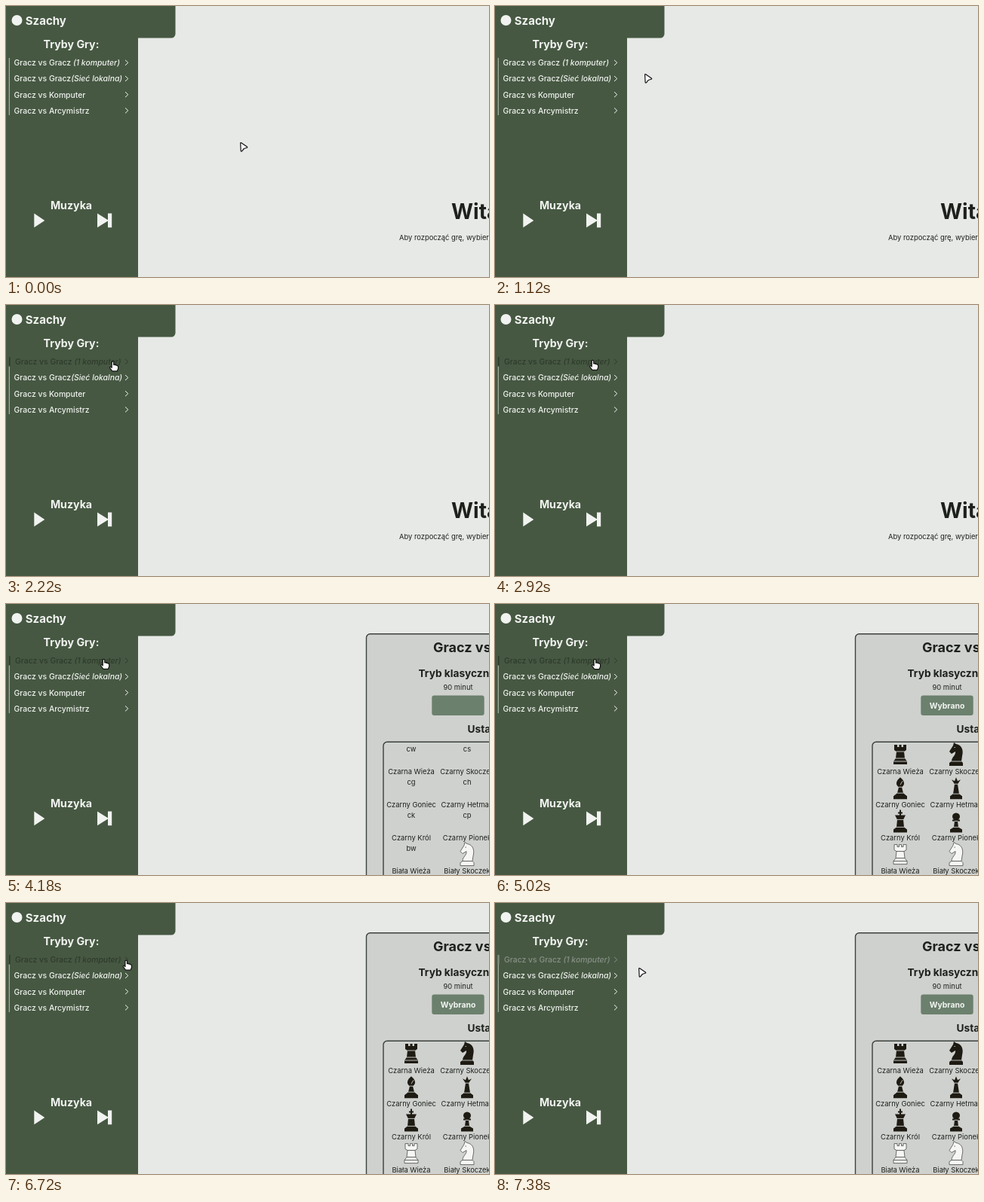
Recreate the animation shown at these times as an HTML page. Size 640 by 360 pixels, loop 7.48 s.

```html
<!DOCTYPE html>
<html lang="pl">
<head>
<meta charset="utf-8">
<style>
  html, body { margin: 0; width: 100%; height: 100%; overflow: hidden; background: #e7e9e6; }
  svg { display: block; width: 640px; height: 360px; font-family: Inter, sans-serif; }
  .bold { font-weight: 700; }
  .mid { text-anchor: middle; }
  .item { font-size: 10.4px; font-weight: 500; }
  .chevron { fill: none; stroke: currentColor; stroke-width: 1; }
  .small { font-size: 9.4px; }
  .black { fill: #1e1b13; stroke: none; }
  .white { fill: #f6f7f5; stroke: #4b4d49; stroke-width: .8; }
  .lines { fill: none; stroke: #cfd1ce; stroke-width: .9; }
  .white + .lines { stroke: #4b4d49; }
  .frame { stroke: #3b413d; stroke-width: 1.4; }
  .cursor { fill: #fff; stroke: #111; stroke-width: 1.2; stroke-linejoin: round; }
</style>
</head>
<body>
<svg viewBox="0 0 640 360">
  <rect width="640" height="360" fill="#e7e9e6"/>

  <g id="welcome" fill="#1d211c">
    <text class="bold" x="590" y="282.5" font-size="28">Witaj</text>
    <text class="small" x="521" y="311">Aby rozpocząć grę, wybierz</text>
  </g>

  <g id="panel" fill="#1d211c">
    <rect class="frame" x="477.5" y="39.7" width="260" height="400" rx="5" fill="#cfd1ce"/>
    <text class="bold" x="566" y="64.3" font-size="18">Gracz vs Gracz</text>
    <text class="bold" x="546.5" y="97.3" font-size="13.7">Tryb klasyczny</text>
    <text class="small mid" x="599" y="113.5">90 minut</text>
    <rect x="564.3" y="121.5" width="69.4" height="26.5" rx="3" fill="#6b806d"/>
    <text id="chosen" class="bold mid" x="599" y="138.5" font-size="10.4" fill="#f3f5f2">Wybrano</text>
    <text class="bold" x="611.5" y="170.5" font-size="13.7">Ustawienie</text>
    <rect class="frame" x="500" y="183.3" width="240" height="300" rx="5" fill="#cfd1ce"/>
    <g id="pieces"></g>
  </g>

  <path d="M0 0H224.5V37a5.5 5.5 0 0 1-5.5 5.5H175V360H0Z" fill="#465842"/>
  <g fill="#f1f3f0">
    <circle cx="14.5" cy="19" r="7"/>
    <text class="bold" x="25.8" y="24.6" font-size="15">Szachy</text>
    <text class="bold mid" x="86.5" y="56.3" font-size="14.2">Tryby Gry:</text>
    <text class="bold mid" x="86.5" y="269.8" font-size="14.2">Muzyka</text>
    <path d="M37.3 275.5V294.3L51.3 285ZM121 275.5V294.3L135 285.6V294.3H140.2V275.5H135V284.2Z"/>
  </g>
  <path d="M4.3 69V145" stroke="#b9c2b7"/>
  <rect id="bar" x="3.6" y="69" height="12.5" fill="currentColor"/>
  <g id="menu" fill="currentColor" color="#f1f3f0"></g>

  <path id="arrow" class="cursor" d="M.7 1.3Q.8.2 1.8.7L9.4 6Q10.3 6.9 9 7.3L5.3 8.5 2.6 11.8Q1.5 12.6 1.2 11.3Z"/>
  <path id="hand" class="cursor" stroke-width="1" d="M-1.3 1.2Q0-.6 1.3 1.2V5Q2.8 4.2 3.6 5.4 5 4.8 5.6 6.1 7.2 5.8 7.2 7.4V10L5.8 13.4H-.6L-3.8 9.2Q-4.4 7.6-2.8 7.6L-1.3 8.8Z"/>
</svg>
<script>
const LOOP = 7480;
const $ = id => document.getElementById(id);

// Menu
const modes = [
  ['Gracz vs Gracz ', '(1 komputer)'],
  ['Gracz vs Gracz', '(Sieć lokalna)'],
  ['Gracz vs Komputer', ''],
  ['Gracz vs Arcymistrz', '']
];
$('menu').innerHTML = modes.map(([label, note], i) => {
  const y = 75.3 + 21.2 * i;
  return `<g><text class="item" x="10.5" y="${y + 3.8}">${label}<tspan font-style="italic">${note}</tspan></text>
    <path class="chevron" d="M158 ${y - 3.5}l3.8 3.5-3.8 3.5"/></g>`;
}).join('');
const hovered = $('menu').firstElementChild;

// Chess pieces: outline and inner lines, centred on x = 0
const shapes = {
  w: ['M-8 3h4v3h2.5v-3h3v3h2.5v-3h4v7l-3 2 1 9 3 4v4h-18v-4l3-4 1-9-3-2z', 'M-5 12h10M-6 21h12M-9 25h18'],
  s: ['M-9 31v-4l3-2c0-6 6-8 5-13l-5 3-3-3 5-8 1-4 3 2c8 1 10 9 8 16l-1 7 2 2v4z', 'M-6 25h13M-2.5 6.5h1.4'],
  g: ['M-9 31v-4l5-4 2-8c-6-4-2-10 2-13 4 3 8 9 2 13l2 8 5 4v4z', 'M0 12l3-5M-2 15h4M-4 23h8'],
  h: ['M-8 31v-4l4-3 2-13-4-6 4 2 2-5 2 5 4-2-4 6 2 13 4 3v4z', 'M-2 11h4M-4 24h8'],
  k: ['M-9 31v-4l4-3 1-10-3-6h6v-2h-2v-2h2v-3h2v3h2v2h-2v2h6l-3 6 1 10 4 3v4z', 'M-4 14h8M-5 24h10'],
  p: ['M-8 31v-4l5-3 1-8h-3v-2h2a5 5 0 1 1 6 0h2v2h-3l1 8 5 3v4z', 'M-2 16h4M-3 24h6']
};
const board = [
  ['cw', 'Czarna Wieża'], ['cs', 'Czarny Skoczek'],
  ['cg', 'Czarny Goniec'], ['ch', 'Czarny Hetman'],
  ['ck', 'Czarny Król'], ['cp', 'Czarny Pionek'],
  ['bw', 'Biała Wieża'], ['bs', 'Biały Skoczek']
];
$('pieces').innerHTML = board.map(([code, name], i) => {
  const [outline, lines] = shapes[code[1]];
  const x = 537 + 74 * (i % 2), y = 184 + 44.2 * (i >> 1);
  return `<g class="small mid" transform="translate(${x} ${y})">
    <text y="41.7">${name}</text>
    ${code === 'bs' ? '' : `<text class="alt" y="11.7">${code}</text>`}
    <g class="${code === 'bs' ? '' : 'image'}">
      <path class="${code[0] === 'c' ? 'black' : 'white'}" d="${outline}"/>
      <path class="lines" d="${lines}"/>
    </g></g>`;
}).join('');
const alts = document.querySelectorAll('.alt');
const images = document.querySelectorAll('.image');

// Pointer path: time, x, y
const path = [
  [0, 310, 181], [100, 310, 181], [1120, 198, 90], [1780, 149, 75.5],
  [2920, 129.5, 73], [4900, 129.5, 73], [5860, 152.5, 74],
  [6580, 157, 75], [7150, 166, 78], [7380, 190, 86], [LOOP, 190, 86]
];
const clamp = v => Math.max(0, Math.min(1, v));
const mix = (a, b, p) => a + (b - a) * p;
const show = (el, on) => el.setAttribute('visibility', on ? 'inherit' : 'hidden');

function pointer(t) {
  const i = path.findIndex(p => p[0] > t);
  const [a, b] = [path[i - 1], path[i]];
  const p = (t - a[0]) / (b[0] - a[0]);
  return [mix(a[1], b[1], p), mix(a[2], b[2], p)];
}

function draw(t) {
  const [x, y] = pointer(t);
  const inside = x < 165;
  for (const [id, on] of [['arrow', !inside], ['hand', inside]]) {
    show($(id), on);
    $(id).setAttribute('transform', `translate(${x} ${y})`);
  }

  const hover = clamp((t - 1400) / 500) - clamp((t - 7150) / 500);
  const color = `rgb(${[[241, 46], [243, 59], [240, 43]].map(([a, b]) => mix(a, b, hover)).join()})`;
  hovered.setAttribute('color', color);
  hovered.firstElementChild.setAttribute('transform', `translate(${Math.min(1.5, hover * 3)} 0)`);
  $('bar').setAttribute('color', color);
  $('bar').setAttribute('width', Math.min(2, hover * 4));

  const opened = t >= 4180, loaded = t >= 4240;
  show($('welcome'), !opened);
  show($('panel'), opened);
  show($('chosen'), loaded);
  alts.forEach(el => show(el, !loaded));
  images.forEach(el => show(el, loaded));
}

function tick() {
  draw(performance.now() % LOOP);
  requestAnimationFrame(tick);
}
tick();
</script>
</body>
</html>
```
